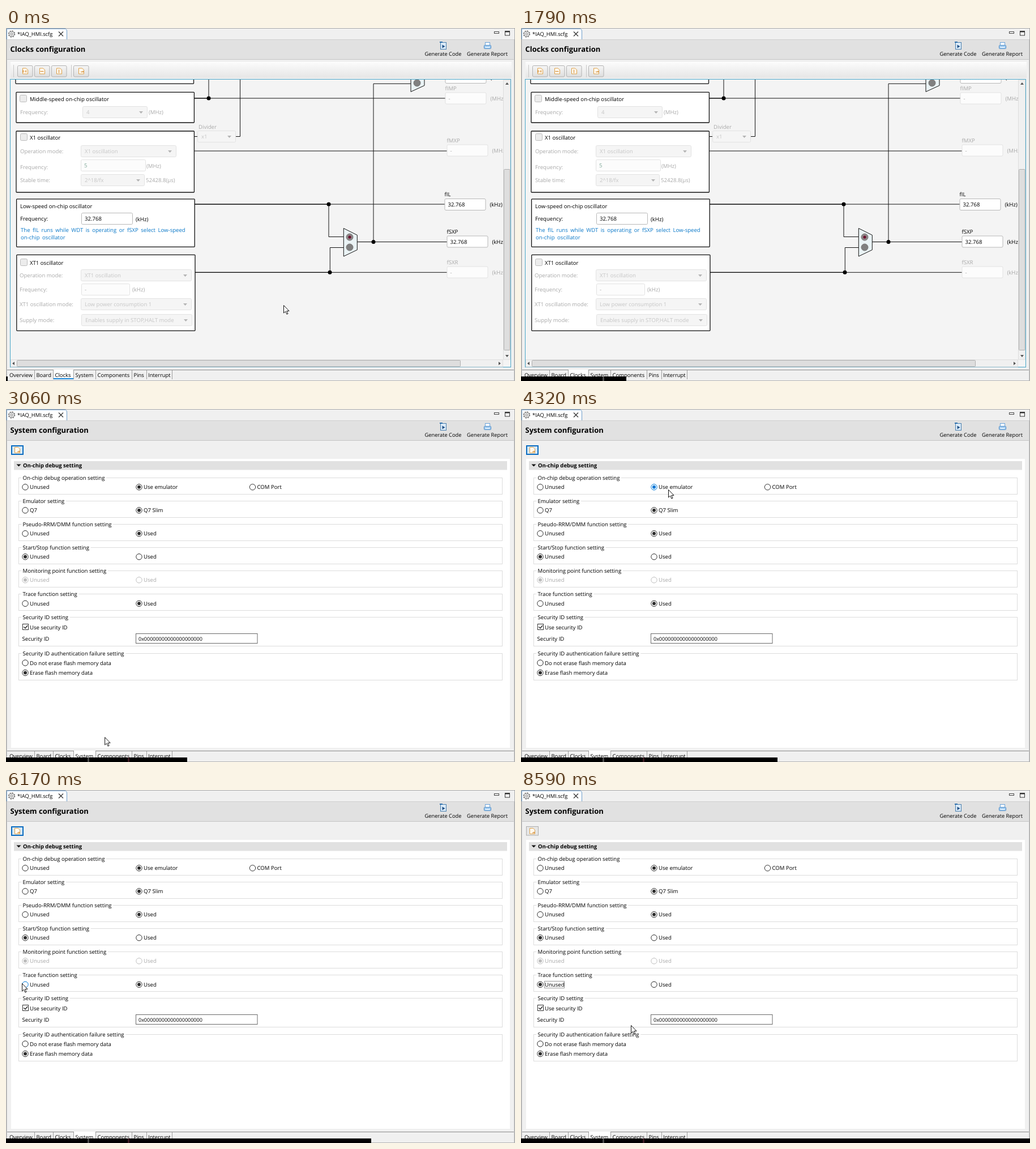
Recreate the animation shown at these times as an HTML page. Size 899 by 623 pixels, loop 8620 ms.

```html
<!DOCTYPE html>
<html lang="en">
<head>
<meta charset="utf-8">
<title>Configurator</title>
<style>
html, body { margin: 0; width: 100%; height: 100%; overflow: hidden; background: #f0f0f0; }
svg { position: absolute; left: 0; top: 0; }
text { font: 9.6px "Open Sans", "Noto Sans", sans-serif; fill: #000; text-rendering: geometricPrecision; white-space: pre; }
.dim { fill: #a9a9a9; }
.faint { fill: #c6c6c6; }
.valid { fill: #7fa898; }
.tab { font-size: 9.45px; }
.act { font-size: 9.3px; }
.title { font-size: 13px; font-weight: 700; }
.sect { font-size: 9.5px; font-weight: 700; }
.num { font-size: 9px; }
.note { fill: #0a78c8; word-spacing: 2px; }

#bar {
  position: absolute; left: 0; top: 615px; height: 8px;
  background: linear-gradient(90deg, #000 144px, #484848 0 147px, #000 0 215px, #3c1a22 0 218px, #000 0);
  animation: bar 8620ms steps(216, jump-none) infinite;
}
@keyframes bar { from { width: 3px } to { width: 899px } }

#cursor { animation: move 8620ms linear infinite; }
@keyframes move {
  0%, 3.5% { transform: translate(490px, 489px) }
  11% { transform: translate(240px, 568px) }
  14.85% { transform: translate(150px, 591px) }
  16.8% { transform: translate(139px, 611px) }
  18.6%, 31.3% { transform: translate(138px, 616px) }
  35.5% { transform: translate(174px, 579px) }
  38.3% { transform: translate(196px, 541px) }
  41.3% { transform: translate(228px, 388px) }
  45.2% { transform: translate(262px, 238px) }
  47.6%, 52.8% { transform: translate(260px, 142px) }
  58% { transform: translate(262px, 172px) }
  62.4% { transform: translate(256px, 216px) }
  68.5% { transform: translate(40px, 338px) }
  70.8%, 83.5% { transform: translate(28px, 341px) }
  88.2% { transform: translate(110px, 379px) }
  92.2%, 100% { transform: translate(194px, 415px) }
}

.old, .new, .paint, .full, .before, .after, .hover1, .hover2 { animation: 8620ms step-end infinite; }
.old { animation-name: old }
.new { animation-name: new }
.paint { animation-name: paint }
.full { animation-name: full }
.before { animation-name: before }
.after { animation-name: after }
.hover1 { animation-name: hover1 }
.hover2 { animation-name: hover2 }
@keyframes old { 0% { visibility: visible } 23.43%, to { visibility: hidden } }
@keyframes new { 0% { visibility: hidden } 23.43%, to { visibility: visible } }
@keyframes paint { 0% { visibility: hidden } 23.43% { visibility: visible } 24.6%, to { visibility: hidden } }
@keyframes full { 0% { visibility: hidden } 24.6%, to { visibility: visible } }
@keyframes before { 0% { opacity: 1 } 76.5%, to { opacity: 0 } }
@keyframes after { 0% { opacity: 0 } 76.5%, to { opacity: 1 } }
@keyframes hover1 { 0% { color: #2b2b2b } 46.8% { color: #0078d7 } 54%, to { color: #2b2b2b } }
@keyframes hover2 { 0% { color: #2b2b2b } 69.8% { color: #0078d7 } 85%, to { color: #2b2b2b } }
</style>
</head>
<body>
<svg id="stage" width="899" height="623" viewBox="0 0 899 623"></svg>
<div id="bar"></div>
<script>
const text = (x, y, s, cls = '') => `<text x="${x}" y="${y}" class="${cls}">${s}</text>`;
const rect = (x, y, w, h, fill, stroke = 'none', more = '') =>
  `<rect x="${x}" y="${y}" width="${w}" height="${h}" fill="${fill}" stroke="${stroke}" ${more}/>`;
const path = (d, stroke = '#000', fill = 'none', w = 1) =>
  `<path d="${d}" stroke="${stroke}" fill="${fill}" stroke-width="${w}"/>`;
const dot = (x, y, r, fill, stroke = 'none') =>
  `<circle cx="${x}" cy="${y}" r="${r}" fill="${fill}" stroke="${stroke}"/>`;
const group = (cls, ...parts) => `<g class="${cls}">${parts.join('')}</g>`;

// Clock page widgets
const panel = (x, y, right, bottom) =>
  rect(x, y, right - x, bottom - y, '#fff', '#111', 'rx="1" stroke-width="1.3"');
const combo = (x, y, w, s) => rect(x + .5, y + .5, w, 20, '#f5f5f5', '#e2e2e2', 'rx="2"') +
  text(x + 7, y + 14, s, 'faint') + path(`M${x + w - 14} ${y + 9}h7l-3.5 4z`, 'none', '#b4b4b4');
const field = (x, y, w, s, cls) =>
  rect(x + .5, y + .5, w, 20, cls ? '#fcfcfc' : '#fff', cls ? '#e2e2e2' : '#b8b8b8', 'rx="2"') +
  text(x + 6, y + 14, s, cls);
const check = (x, y) => rect(x + .5, y + .5, 12, 12, '#ececec', '#bcbcbc', 'rx="2"');
const output = (x, y, name, value, unit, dim) =>
  text(x, y - 4, name, dim) + field(x, y, 72, value, dim) + text(x + 80, y + 14, unit, dim);

const panels = () => [
  panel(17, 60, 331.5, 98.3), panel(18, 113.3, 332.4, 167),
  panel(18, 182, 332.4, 290), panel(18.6, 301.8, 333.2, 386.3), panel(18.8, 400.3, 334, 534.3),
  check(24, 118), text(42, 128.5, 'Middle-speed on-chip oscillator'),
  text(25, 152, 'Frequency:', 'dim'), combo(135, 138, 114, '4'), text(252, 152, '(MHz)', 'dim'),
  check(25, 186), text(42, 196.5, 'X1 oscillator'),
  text(25, 221, 'Operation mode:', 'dim'), combo(132, 207, 168, 'X1 oscillation'),
  text(25, 249, 'Frequency:', 'dim'), field(132, 232, 114, '5', 'valid'), text(248, 246.5, '(MHz)', 'dim'),
  text(25, 272, 'Stable time:', 'dim'), combo(132, 258, 112, '2^18/fx'), text(247, 272, '52428.8(µs)', 'dim'),
  text(25, 318, 'Low-speed on-chip oscillator'),
  text(25, 340, 'Frequency:'), field(133, 326, 90, '32.768'), text(229, 340.5, '(kHz)'),
  text(26, 360, 'The fIL runs while WDT is operating or fSXP select Low-speed', 'note'),
  text(26, 373, 'on-chip oscillator', 'note'),
  check(25, 407), text(42, 417.5, 'XT1 oscillator'),
  text(24, 440, 'Operation mode:', 'dim'), combo(132, 426, 195, 'XT1 oscillation'),
  text(24, 464.5, 'Frequency:', 'dim'), field(133, 451, 85, '-', 'dim'), text(223, 464.5, '(kHz)', 'dim'),
  text(24, 490.5, 'XT1 oscillation mode:', 'dim'), combo(132, 477, 195, 'Low power consumption 1'),
  text(24, 518.5, 'Supply mode:', 'dim'), combo(133, 505, 195, 'Enables supply in STOP,HALT mode'),
].join('');

const wires = () => [
  path('M358 85V124M332 124H776M332 191.500H338M406 191.500H413.500V85M332 217H779M649 377V98.300H715', '#111'),
  path('M333 311H775M570 311V368.500H596M620 377.500H779M334 431.300H779M572.300 431V387.500H596', '#111'),
  path('M332 124H358M333 311H570M620 377.500H649M334 431.300H572', '#000'),
  dot(358, 124, 3.5, '#000'), dot(570, 311, 3.5, '#000'), dot(649, 377.5, 3.5, '#000'), dot(572, 431.3, 3.5, '#000'),
  path('M596.300 353.500L620.300 365.500V391.500L596.300 403Z', '#111', '#eaf3f5'),
  dot(607, 369, 6, '#8c8686', '#777'), dot(607, 369, 2.6, '#6b1230'), dot(607, 387, 6, '#808080', '#777'),
  path('M715 70V112.500L739 101.500V70', '#111', '#eaf3f5'), dot(726, 97, 6, '#808080', '#777'),
  text(340, 177.5, 'Divider', 'dim'), combo(338, 181, 67, 'x1'),
  output(775.5, 77, '', '32.000', '(MHz)'),
  output(775.5, 113.5, 'fIMP', '-', '(MHz)', 'dim'),
  output(778.5, 205.5, 'fMXP', '-', '(MHz)', 'dim'),
  output(774.5, 301, 'fIL', '32.768', '(kHz)'),
  output(778.5, 366.5, 'fSXP', '32.768', '(kHz)'),
  output(778.5, 420.5, 'fSXR', '-', '(kHz)', 'dim'),
].join('');

const scrollbars = () => [
  rect(878.5, 92, 12, 493, '#f0f0f0', '#dedede'), rect(879.5, 249.5, 10.5, 319, '#dedede', '#b0b0b0', 'rx="1"'),
  path('M882 100h6l-3-4zM882 577h6l-3 4z', 'none', '#555'),
  rect(8.5, 585.5, 869, 12.5, '#f0f0f0', '#dedede'), rect(19.5, 586.5, 783, 11, '#dedede', '#b0b0b0', 'rx="1"'),
  path('M15 589v6l-4-3zM870 589v6l4-3z', 'none', '#555'),
].join('');

const defs = `<defs>
  <linearGradient id="strip" x2="0" y2="1"><stop stop-color="#fbfbfb"/><stop offset="1" stop-color="#e6e6e6"/></linearGradient>
  <linearGradient id="button" x2="0" y2="1"><stop stop-color="#f6f6f6"/><stop offset="1" stop-color="#dedede"/></linearGradient>
  <clipPath id="view"><path d="M8 91H878V585H8Z"/></clipPath>
  <clipPath id="gaps">${rect(15, 110, 7, 373)}${rect(878, 110, 3, 373)}
    ${[110, 151, 192, 233.5, 275, 316, 357, 420.5, 479.5].map(y => rect(15, y, 866, 4)).join('')}</clipPath>
  <g id="clocks">${rect(7.5, 90.5, 884, 508, '#f4f4f4', '#4aa6c9')}
    <g clip-path="url(#view)">${panels()}${wires()}</g>${scrollbars()}</g>
</defs>`;

// Window frame
const page = (x, y, mark) =>
  path(`M${x} ${y}h6l3 3v7h-9z`, '#dca04a', '#fffaf0') + path(mark, '#d08020');
const gear = () => dot(10, 10.5, 4.6, '#eee', '#777') + dot(10, 10.5, 1.8, '#fff', '#777') +
  `<circle cx="10" cy="10.500" r="5.500" fill="none" stroke="#777" stroke-width="1.600" stroke-dasharray="2.160"/>`;
const frame = () => [
  rect(0, 0, 899, 623, '#f0f0f0'),
  path('M1.5 20V1.500H104Q107.500 1.500 107.500 6V20', '#6c9ccb', '#fff'),
  gear(), text(20, 14, '*IAQ_HMI.scfg', 'act'),
  path('M93 6.500l8 8M101 6.500l-8 8', '#333', 'none', 1.2),
  rect(862.5, 6.5, 8, 3, '#fff', '#444'),
  rect(881.5, 5.5, 8, 7.5, '#fff', '#333'), path('M881 6.500h9', '#333', 'none', 2),
  rect(2, 21, 895, 34, '#e1e1e1'), path('M2 20.500H897', '#cfcfcf'), path('M2 55.500H897', '#c4c4c4'),
  rect(767.5, 25.5, 10, 12, '#dcebf8', '#4a7fae'), path('M770.5 29.500v6l5-3z', 'none', '#1d4f86'),
  path('M766 25h5', '#2d70ad', 'none', 2), text(739.5, 48.5, 'Generate Code', 'act'),
  rect(846.5, 25.5, 8, 6, '#fff', '#6aa2d8'), rect(844.5, 30.5, 12, 6, '#a9d0f2', '#4a88c4', 'rx="1"'),
  path('M847 34.500h7', '#fff'), text(814, 48.5, 'Generate Report', 'act'),
  path('M2 603.500H897', '#8a8a8a'), path('M1.5 20V623M897.500 20V622', '#c8c8c8'), path('M0 622.500H899', '#b4b4b4'),
  path('M.5 0V622M898.500 0V622M0 .5H899', '#a8a8a8'),
].join('');
const tabNames = [[6, 'Overview'], [53.5, 'Board'], [86.5, 'Clocks'], [122.5, 'System'],
  [161.5, 'Components'], [225.5, 'Pins'], [251, 'Interrupt']];
const tabs = () => tabNames.map(([x, s]) => text(x, 615.5, s, 'tab')).join('') +
  [50, 83, 119, 158, 222, 248, 293].map(x => path(`M${x}.5 604V620`, '#a0a0a0')).join('');
const picked = (x, w) => rect(x, 603, w, 17, '#fff') + path(`M${x} 619h${w}`, '#1a86d8', 'none', 2);

const clockPage = () => [
  text(7.5, 41.5, 'Clocks configuration', 'title'),
  rect(8, 61, 885, 27, 'url(#strip)'), path('M8 60.500H893', '#fff'), path('M13.5 65V87M115.500 65V87', '#c8c8c8'),
  ...[[20, 'M30.5 74.500v4M33.500 75.500v2M35.500 74.500v4'], [50, 'M60.500 76.500h6'], [80, 'M93.500 73.500v6'], [119, 'M132 77.500h5l-2-2']]
    .map(([x, mark]) => rect(x + .5, 66.5, 26.5, 19.5, 'url(#button)', '#b2b2b2', 'rx="2"') + page(x + 9.5, 71, mark)),
  '<use href="#clocks"/>', picked(84, 35),
].join('');

// System page widgets
const radio = (x, y, s, on, opt = {}) => {
  const ink = opt.off ? '#bdbdbd' : 'currentColor';
  const mark = on ? group(opt.dot || '', dot(x, y, 3, ink)) : '';
  return `<g class="${opt.hover || ''}" color="#2b2b2b">${dot(x, y, 5.2, '#fff', ink)}${mark}</g>` +
    text(x + 8, y + 3.5, s, opt.off ? 'dim' : '');
};
const box = (y, h, s, ...parts) =>
  rect(22.5, y + .5, 854, h, 'none', '#dcdcdc') +
  `<text x="29.500" y="${y + 3.5}" stroke="#fff" stroke-width="6" paint-order="stroke">${s}</text>` + parts.join('');
const pair = (y, s, a, b, second, off) =>
  box(y, 29, s, radio(34, y + 16.8, a, !second, { off }), radio(235, y + 16.8, b, second, { off }));

const settings = () => [
  path('M18.5 97.500h8l-4 4z', 'none', '#111'), text(30, 102.5, 'On-chip debug setting', 'sect'),
  box(121, 29, 'On-chip debug operation setting', radio(34, 137.8, 'Unused'),
    radio(235, 137.8, 'Use emulator', true, { hover: 'hover1' }), radio(435.5, 137.8, 'COM Port')),
  pair(162, 'Emulator setting', 'Q7', 'Q7 Slim', true),
  pair(203, 'Pseudo-RRM/DMM function setting', 'Unused', 'Used', true),
  pair(244, 'Start/Stop function setting', 'Unused', 'Used', false),
  pair(285, 'Monitoring point function setting', 'Unused', 'Used', false, true),
  box(326, 29, 'Trace function setting',
    radio(34, 343.3, 'Unused', true, { hover: 'hover2', dot: 'after' }),
    radio(235, 343.3, 'Used', true, { dot: 'before' }),
    group('after', rect(41.5, 337.5, 35, 12, 'none', '#333', 'stroke-dasharray="1"'))),
  box(367, 51, 'Security ID setting', rect(29.5, 379.5, 10, 10, '#fff', '#333'),
    path('M31.5 384.500l2.500 2.500 4-5', '#222', 'none', 1.3),
    text(42, 388.5, 'Use security ID'), text(28.5, 408.5, 'Security ID'),
    text(234, 408.5, '0x' + '0'.repeat(20), 'num')),
  box(431, 47, 'Security ID authentication failure setting',
    radio(34, 448, 'Do not erase flash memory data'), radio(34, 465.5, 'Erase flash memory data', true)),
].join('');

const systemPage = () => [
  text(7.5, 41.5, 'System configuration', 'title'),
  rect(9, 88, 881, 510, '#fff'), rect(14, 92, 871, 15.5, '#e1e1e1'),
  group('after', rect(9.5, 64.5, 21, 15.5, '#e6e6e6', '#adadad')),
  group('before', rect(10, 65, 20, 15, '#d6e8f6', '#0a6cc0', 'stroke-width="2"')),
  page(15.5, 67.5, 'M20 75.500h4l-2-2'), picked(120, 38),
].join('');

const halfPainted = '<use href="#clocks" clip-path="url(#gaps)"/>' +
  rect(30, 92, 104, 12, '#fff') + path('M30 98.500h104', '#000');
const input = rect(229.5, 396.5, 214.5, 17, '#fff', '#6a6a6a');
const arrow = '<g id="cursor">' +
  path('M.5 .5V14L3.700 11.200L5.900 16.200L8 15.200L5.800 10.400H10Z', '#111', '#fff') + '</g>';

document.getElementById('stage').innerHTML = defs + frame() +
  group('old', clockPage()) +
  group('new', systemPage()) +
  group('paint', halfPainted) +
  group('new', input) +
  group('full', settings()) +
  tabs() + arrow;
</script>
</body>
</html>
```
